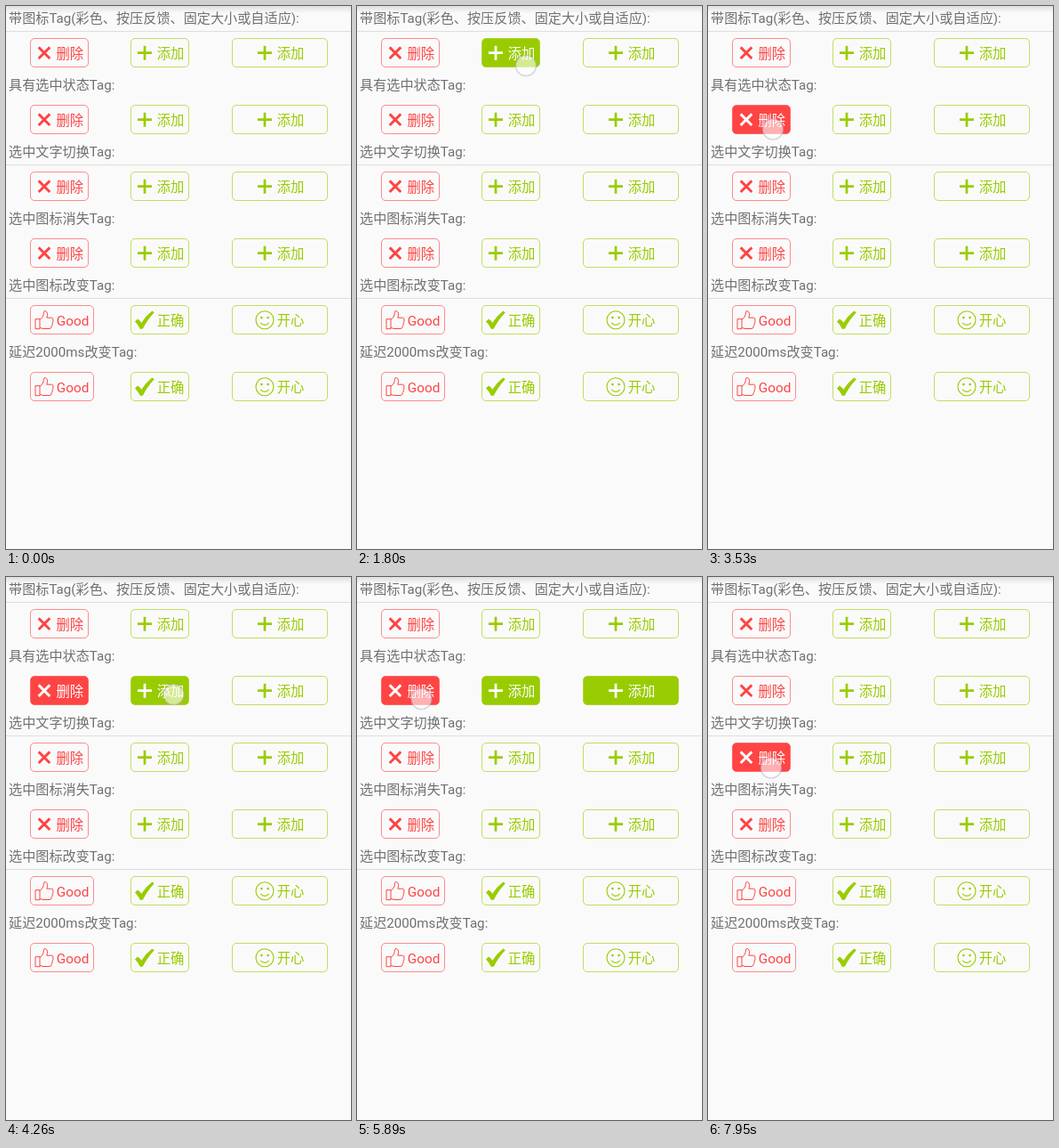
Write an HTML page that moves like this. It is 388 px wide and 610 px high and loops after 8 s.

```html
<!DOCTYPE html>
<html lang="zh-CN">
<head>
<meta charset="utf-8">
<style>
  html, body { margin: 0; width: 100%; height: 100%; overflow: hidden; background: #fafafa; }
  svg { display: block; }
  text { font: 15.15px Roboto, "Noto Sans CJK SC", "Noto Sans CJK", sans-serif; }
  .label { fill: #707070; }
  .red { color: #ff4444; }
  .green { color: #99cc00; }
  .box { fill: none; stroke: currentColor; stroke-opacity: .6; }
  .ink text { fill: currentColor; font-size: 15.35px; }
  .ink path { fill: none; stroke: currentColor; stroke-linejoin: round; }
  .ink .solid { fill: currentColor; stroke: none; }
  .on .box { fill: currentColor; }
  .on .ink { color: #fff; }
  #touch { fill: rgba(255, 255, 255, .58); stroke: rgba(165, 158, 190, .42); stroke-width: 1.5; }
</style>
</head>
<body>
<svg id="stage" width="388" height="610" viewBox="0 0 388 610">
  <defs>
    <linearGradient id="shade" x2="0" y2="1">
      <stop stop-color="#e0dee2"/><stop offset="1" stop-color="#fafafa"/>
    </linearGradient>
  </defs>
  <rect width="388" height="8" fill="url(#shade)"/>
  <path d="M0 28.5H388M0 178.5H388M0 328.5H388" stroke="#dedee0"/>
  <g id="rows"></g>
  <circle id="touch" r="11.5"/>
</svg>
<script>
const LOOP = 8000, PITCH = 75, FADE = 180;

// Icons are drawn around their own centre.
const icons = {
  cross: '<path d="M-6.3-6.3 6.3 6.3M6.3-6.3-6.3 6.3" stroke-width="2.9"/>',
  plus: '<path d="M-8 0H8M0-8V8" stroke-width="2.7"/>',
  check: '<path class="solid" d="M-11 1.8-8-1.2Q-5 .6-3.8 3.3 1-4.5 8.3-10.2L10.8-8.4Q2.5.5-2 9.8L-5 10.3Q-7.5 5-11 1.8Z"/>',
  smile: '<path d="M-10 0A10 10 0 1 1 10 0 10 10 0 1 1-10 0M-4.8 3.2Q0 8 4.8 3.2" stroke-width="1.1"/>' +
    '<path d="M-3.6-2.6h0M3.6-2.6h0" stroke-width="2.6" stroke-linecap="round"/>',
  thumb: '<path d="M-10-1H-5V10H-10ZM-5-.5Q-.5-3-.6-8.5-.3-10.8 1.8-10 4.8-8 2.8-2.5H8.5Q10.7-2 9.8.3 10.6 2 9.2 3.6 9.8 5.4 8.3 6.8 8.5 9.5 6 9.8H-1Q-3 9.5-5 8.6"/>'
};

const labels = ['带图标Tag(彩色、按压反馈、固定大小或自适应):', '具有选中状态Tag:', '选中文字切换Tag:',
  '选中图标消失Tag:', '选中图标改变Tag:', '延迟2000ms改变Tag:'];
// colour, left, width, icon x, text x, icon, text
const plain = [
  ['red', 27.5, 65, 43, 56.5, 'cross', '删除'],
  ['green', 140.5, 65, 156, 169.7, 'plus', '添加'],
  ['green', 254.5, 107, 291, 304.7, 'plus', '添加']
];
const fancy = [
  ['red', 27.5, 71, 43, 56.7, 'thumb', 'Good'],
  ['green', 140.5, 65, 156, 169.7, 'check', '正确'],
  ['green', 254.5, 107, 291, 304.7, 'smile', '开心']
];

const tagMarkup = ([color, x, w, iconX, textX, icon, text]) => `
  <g class="tag ${color}">
    <rect class="box" x="${x}" y="36.5" width="${w}" height="32" rx="4.5"/>
    <g class="ink">
      <g transform="translate(${iconX} 52.7)">${icons[icon]}</g>
      <text x="${textX}" y="58.6">${text}</text>
    </g>
  </g>`;

const rows = document.getElementById('rows');
rows.innerHTML = labels.map((label, i) => `
  <g transform="translate(0 ${i * PITCH})">
    <text class="label" x="3" y="19.2">${label}</text>
    ${(i < 4 ? plain : fancy).map(tagMarkup).join('')}
  </g>`).join('');
const tags = [...rows.querySelectorAll('.tag')];
const touch = document.getElementById('touch');

// Tag index, finger down, touch dot gone, dot x, dot y
const presses = [
  [0, 1050, 1310, 73, 61], [1, 1800, 2100, 190, 67], [2, 2630, 2980, 332, 59.5],
  [3, 3530, 3830, 73, 138.5], [4, 4260, 4550, 188.5, 132], [5, 5160, 5390, 326, 143.5],
  [3, 5890, 6190, 72.5, 137], [4, 6500, 6800, 197.5, 138], [5, 7170, 7400, 326, 143],
  [6, 7950, 8300, 71, 214.5]
];
const isToggle = tag => tag >= 3 && tag <= 5;

function draw(t) {
  const filled = new Set(), selected = new Set();
  let alpha = 0;
  for (const [tag, down, end, x, y] of presses) {
    if (t < down) break;
    const up = end - FADE;
    if (t < up) filled.add(tag);
    else if (isToggle(tag) && !selected.delete(tag)) selected.add(tag);
    if (t < end) {
      alpha = Math.min(1, (end - t) / FADE);
      touch.setAttribute('cx', x);
      touch.setAttribute('cy', y);
    }
  }
  touch.style.opacity = alpha;
  tags.forEach((el, i) => el.classList.toggle('on', filled.has(i) || selected.has(i)));
}

function tick() {
  draw(performance.now() % LOOP);
  requestAnimationFrame(tick);
}
tick();
</script>
</body>
</html>
```
